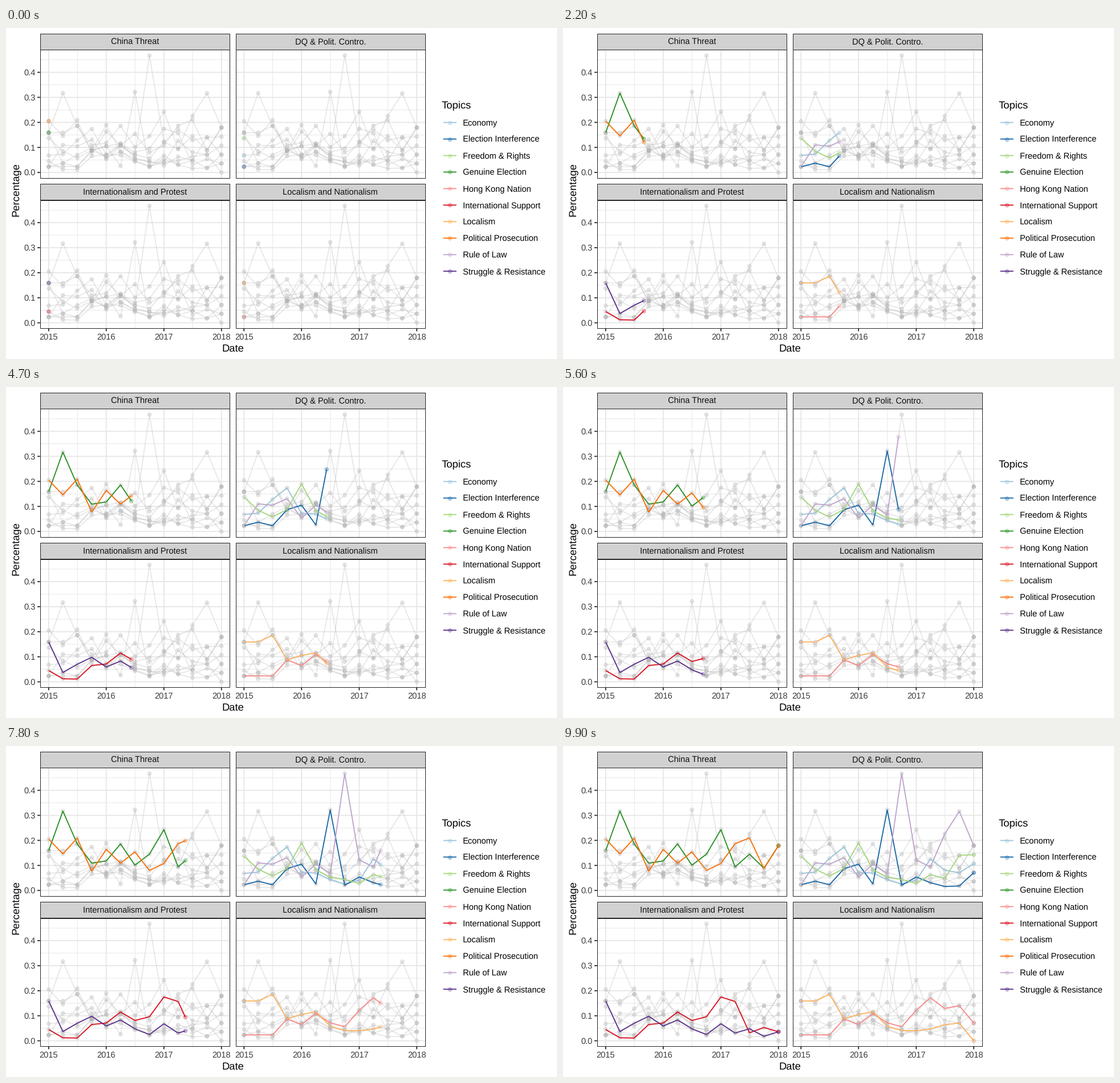
Animation, 966 px wide and 580 px high, one loop 10000 ms. Source, as a matplotlib script:

```python
import numpy as np
import matplotlib.pyplot as plt
from matplotlib.animation import FuncAnimation
from matplotlib.patches import Rectangle

W, H, DPI = 966, 580, 100
FRAMES = 100
PT = 72 / DPI                      # points per pixel
SMALL, LARGE = 14.67, 18.33        # font sizes in pixels
LINE = 1.78                        # line width in pixels
DOT, DOT_EDGE, ALPHA = 6.5, 1.2, 0.3

INK, GRID, SHADE, STRIP = "#242424", "#e6e6e6", "#b2b2b2", "#d1d1d1"

PANEL_W, PANEL_H, STRIP_H = 333.2, 225.4, 28.8
PEAK = 0.467

# name: (colour, panel, quarterly shares in thousandths)
TOPICS = {
    "Economy": ("#97c5dd", 1, [68, 73, 128, 174, 71, 70, 43, 25, 41, 126, 81, 71, 107]),
    "Election Interference": ("#1466a7", 1, [23, 37, 23, 87, 105, 26, 322, 21, 54, 31, 16, 18, 71]),
    "Freedom & Rights": ("#a4d879", 1, [137, 85, 58, 88, 190, 83, 53, 44, 28, 63, 48, 140, 143]),
    "Genuine Election": ("#24901e", 0, [159, 317, 186, 109, 118, 186, 101, 145, 243, 94, 145, 89, 179]),
    "Hong Kong Nation": ("#fa8a89", 3, [23, 24, 23, 87, 65, 109, 72, 56, 122, 172, 129, 140, 71]),
    "International Support": ("#db0c1c", 2, [45, 12, 11, 65, 71, 115, 81, 96, 175, 157, 32, 53, 36]),
    "Localism": ("#fdb35c", 3, [159, 159, 186, 88, 105, 116, 58, 41, 40, 47, 64, 71, 0]),
    "Political Prosecution": ("#ff6d00", 0, [205, 146, 209, 77, 164, 109, 154, 80, 108, 187, 210, 88, 179]),
    "Rule of Law": ("#c0a4ce", 1, [23, 110, 105, 131, 53, 105, 67, 467, 122, 94, 226, 316, 179]),
    "Struggle & Resistance": ("#572d8a", 2, [159, 37, 70, 98, 59, 83, 48, 25, 68, 31, 48, 18, 36]),
}
PANELS = [
    ("China Threat", 59.7, 38.0),
    ("DQ & Polit. Contro.", 402.1, 38.0),
    ("Internationalism and Protest", 59.7, 301.4),
    ("Localism and Nationalism", 402.1, 301.4),
]

quarters = np.arange("2015-01", "2018-04", 3, dtype="datetime64[M]").astype("datetime64[D]")
days = (quarters - quarters[0]).astype(float)
SPAN = days[-1]
keys = np.round(days / SPAN * (FRAMES - 1))   # each quarter lands on a whole frame

plt.rcParams.update({"font.family": "Liberation Sans", "text.hinting": "no_hinting"})
fig = plt.figure(figsize=(W / DPI, H / DPI), dpi=DPI, facecolor="white")
ax = fig.add_axes([0, 0, 1, 1])
ax.set_xlim(0, W)
ax.set_ylim(H, 0)
ax.axis("off")


def px(panel, day):
    return PANELS[panel][1] + PANEL_W * (0.05 + np.asarray(day) / SPAN) / 1.1


def py(panel, share):
    return PANELS[panel][2] + PANEL_H * (1.05 - np.asarray(share) / PEAK) / 1.1


def stroke(xs, ys, color, width=LINE, z=1.0, **kw):
    return ax.plot(xs, ys, color=color, lw=width * PT, zorder=z, snap=False,
                   solid_capstyle="butt", solid_joinstyle="round", **kw)[0]


def dots(xs, ys, colors, z):
    return ax.scatter(xs, ys, s=(DOT * PT) ** 2, c=colors, alpha=ALPHA,
                      edgecolors="face", linewidths=DOT_EDGE * PT, zorder=z)


def label(x, y, text, size=SMALL, color="black", ha="left", **kw):
    ax.text(x, y, text, fontsize=size * PT, color=color, ha=ha,
            va="baseline", zorder=10, **kw)


def box(x, y, w, h, fill):
    ax.add_patch(Rectangle((x + 0.45, y + 0.45), w - 0.9, h - 0.9, facecolor=fill,
                           edgecolor=INK, lw=PT, zorder=8))


def draw_grid(i, left, top):
    right, bottom = left + PANEL_W, top + PANEL_H
    year_days = days[::4]
    for xs, width, z in ((year_days[:-1] + np.diff(year_days) / 2, LINE / 2, 0),
                         (year_days, LINE, 1)):
        for x in px(i, xs):
            stroke([x, x], [top, bottom], GRID, width, z)
    for start, width, z in ((0.05, LINE / 2, 0), (0.0, LINE, 1)):
        for y in py(i, np.arange(start, 0.46, 0.1)):
            stroke([left, right], [y, y], GRID, width, z)


def draw_axes(i, left, top):
    bottom = top + PANEL_H
    if i % 2 == 0:
        for k in range(5):
            y = py(i, k / 10)
            stroke([left - 4.6, left], [y, y], INK)
            label(left - 8.3, y + 5.2, f"{k / 10:.1f}", color="#3b3b3b", ha="right")
    if i >= 2:
        for year, x in zip(range(2015, 2019), px(i, days[::4])):
            stroke([x, x], [bottom, bottom + 4.6], INK)
            label(x, 546.2, str(year), color="#3b3b3b", ha="center")


def draw_panel(i):
    title, left, top = PANELS[i]
    draw_grid(i, left, top)
    draw_axes(i, left, top)
    xs = px(i, days)
    ys = [py(i, np.array(vals) / 1000) for _, _, vals in TOPICS.values()]
    for y in ys:
        stroke(xs, y, SHADE, z=2, alpha=ALPHA)
    dots(np.tile(xs, len(ys)), np.concatenate(ys), [SHADE] * (len(xs) * len(ys)), 3)
    box(left, top - STRIP_H, PANEL_W, STRIP_H, STRIP)
    box(left, top, PANEL_W, PANEL_H, "none")
    label(left + PANEL_W / 2, top - 9, title, color="#0f0f0f", ha="center")


def draw_legend():
    label(763.5, 140.3, "Topics", LARGE)
    for k, (name, (color, _, _)) in enumerate(TOPICS.items()):
        y = 165.6 + 28.95 * k
        stroke([766.6, 789.7], [y, y], color, z=4)
        dots([778.2], [y], [color], 5)
        label(801.2, y + 5.4, name)


for i in range(len(PANELS)):
    draw_panel(i)
draw_legend()
label(397.5, 567.3, "Date", LARGE, ha="center")
ax.text(22.3, 283, "Percentage", fontsize=LARGE * PT, rotation=90, ha="right",
        va="center", rotation_mode="default", zorder=10).set(
            ha="center", va="baseline", rotation_mode="anchor")

trails = []
for color, panel, vals in TOPICS.values():
    trails.append((stroke([], [], color, z=6), panel, np.array(vals) / 1000))

heads = []
for i in range(len(PANELS)):
    members = [(c, np.array(v) / 1000) for c, p, v in TOPICS.values() if p == i]
    spot = dots(np.zeros(len(members)), np.zeros(len(members)),
                [c for c, _ in members], 7)
    heads.append((spot, [v for _, v in members]))


def update(n):
    day = np.interp(n, keys, days)
    past = keys < n
    for line, panel, vals in trails:
        xs = np.append(days[past], day)
        ys = np.append(vals[past], np.interp(n, keys, vals))
        line.set_data(px(panel, xs), py(panel, ys))
    for i, (spot, members) in enumerate(heads):
        spot.set_offsets([(px(i, day), py(i, np.interp(n, keys, v))) for v in members])


anim = FuncAnimation(fig, update, frames=FRAMES, interval=100, repeat=True)
plt.show()
```
